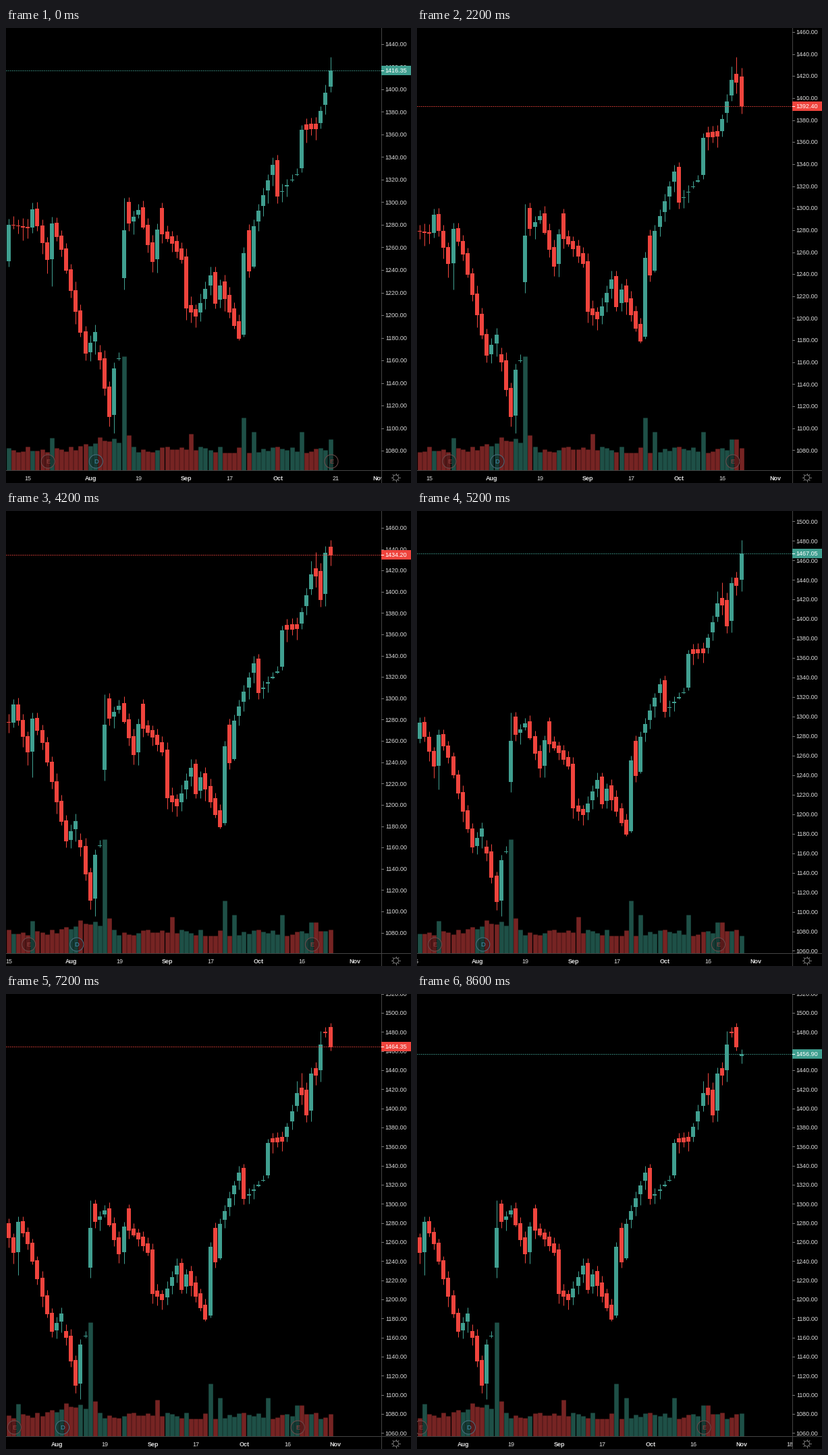
Recreate the animation shown at these times as a matplotlib script. Size 600 px wide and 675 px high, loop 8.8 s.

```python
import numpy as np
import matplotlib.pyplot as plt
from matplotlib.animation import FuncAnimation
from matplotlib.patches import Circle, Rectangle

W, H, DPI = 600, 675, 100
PT = 72 / DPI                       # points per pixel
STEP, LAST_X, BARS, VISIBLE = 7.116, 480.5, 76, 68
TOP, BOTTOM, BASE, AXIS_X = 42.7, 600.7, 655.5, 555.5
UP, DOWN = "#409f90", "#ef443d"
VOL_UP, VOL_DOWN = "#1e5047", "#762423"
TEXT, RULE = "#dadada", "#444444"

# Turning points of the closing price: (bar, price)
TURNS = [(0, 1280), (4, 1277), (5, 1294), (8, 1249), (9, 1281), (11, 1258),
         (16, 1166), (18, 1185), (21, 1110), (22, 1153), (23, 1162), (24, 1275),
         (27, 1293), (30, 1247), (31, 1276), (34, 1263), (36, 1249), (37, 1206),
         (39, 1199), (42, 1235), (43, 1210), (44, 1226), (48, 1179), (49, 1255),
         (50, 1239), (51, 1279), (55, 1333), (56, 1305), (60, 1325), (61, 1364),
         (64, 1365), (66, 1397), (67, 1416.35), (68, 1414.15), (69, 1392.4),
         (70, 1436.45), (71, 1434.2), (72, 1467.05), (73, 1479.1), (74, 1464.35),
         (75, 1456.9)]
# Notable bars that break the general rules
GAPS = {19: -18, 23: 9, 24: 71, 25: 25, 32: 19, 50: 20, 73: 13.4, 75: -9.4}
TALL_WICKS = {24: 29, 67: 12.4, 68: 15.7, 72: 14.1}
DEEP_WICKS = {9: 24, 22: 16}
BUSY_DAYS = {9: 48, 24: 169, 25: 52, 38: 54, 49: 78, 51: 57, 61: 57, 67: 46, 68: 46}


def override(values, special):
    values[list(special)] = list(special.values())
    return values


rng = np.random.default_rng(8)
bars = np.arange(BARS)
closes = np.interp(bars, *zip(*TURNS))
gaps = override(np.linspace(0, 6, BARS), GAPS)
opens = np.concatenate([[1248], closes[:-1]]) + gaps
highs = np.maximum(opens, closes) + override(rng.uniform(4, 8, BARS), TALL_WICKS)
lows = np.minimum(opens, closes) - override(rng.uniform(1, 12, BARS), DEEP_WICKS)
august_swell = 17 * np.exp(-((bars - 20) / 4) ** 2)
volumes = override(rng.uniform(25, 35, BARS) + august_swell, BUSY_DAYS)

rising = closes >= opens
candle_colors = np.where(rising, UP, DOWN)
volume_colors = np.where(rising, VOL_UP, VOL_DOWN)

fig = plt.figure(figsize=(W / DPI, H / DPI), dpi=DPI, facecolor="black")
ax = fig.add_axes([0, 0, 1, 1])


def label(x, y, text, color=TEXT, weight="normal", size=9, z=5):
    ax.text(x, y + 0.36 * size, text, color=color, weight=weight, ha="center",
            va="baseline", fontsize=size * PT, family="Liberation Sans", zorder=z)


def rule(xs, ys, color=RULE, width=1, z=6, **style):
    ax.plot(xs, ys, color=color, lw=width * PT, zorder=z, **style)


def columns(x, y0, y1, color, width, z):
    ax.vlines(x, y0, y1, colors=color, lw=width * PT, zorder=z, capstyle="butt")


def badge(x, letter, ring, ink):
    ax.add_patch(Circle((x, 643), 10, fc=(0, 0, 0, 0.25), ec=ring, lw=PT, zorder=4))
    label(x, 643, letter, ink, size=9.5)


def gear(x, y, color="#757575"):
    ax.add_patch(Circle((x, y), 4, fill=False, ec=color, lw=PT, zorder=8))
    for a in np.arange(8) * np.pi / 4:
        r = np.array([4.3, 6.2])
        rule(x + r * np.cos(a), y + r * np.sin(a), color, 1, 8)


def draw_candles(first, last, x_of, y_of):
    s = slice(first, last + 1)
    x = x_of(bars[s])
    columns(x, BASE, BASE - volumes[s], volume_colors[s], 6.6, 1)
    columns(x, y_of(highs[s]), y_of(lows[s]), candle_colors[s], 1, 2)
    top = y_of(np.maximum(opens[s], closes[s]))
    bottom = np.maximum(y_of(np.minimum(opens[s], closes[s])), top + 1.5)
    columns(x, top, bottom, candle_colors[s], 6, 3)


def draw_time_axis(shift, x_of):
    ticks = [(4, "15"), (17, "Aug"), (27, "19"), (37, "Sep"), (46, "17"), (56, "Oct")]
    ticks.append((65, "16") if shift else (68, "21"))
    ticks.append((77 if shift == 0 else 76 if shift < 5 else 75, "Nov"))
    if shift == 8:
        ticks.append((85, "18"))
    for bar, text in ticks:
        label(x_of(bar) + 0.5, 667.3, text, weight="bold" if text.isalpha() else "normal")


def draw_price_axis(last, y_of):
    ax.add_patch(Rectangle((AXIS_X, 0), W - AXIS_X, H, color="black", lw=0, zorder=6))
    rule([AXIS_X] * 2, [0, H])
    rule([0, W], [BASE] * 2)
    for price in range(1040, 1540, 20):
        y = y_of(price)
        if -4 < y < 654:
            rule([556, 559], [y, y], "#777777")
            label(578, y, f"{price}.00", z=7)
    close, color = closes[last], candle_colors[last]
    y = np.floor(y_of(close)) - 0.5
    rule([0, AXIS_X], [y, y], color, z=5, dashes=(1.4, 1.4), dash_capstyle="butt")
    ax.add_patch(Rectangle((AXIS_X, y - 6.5), W - AXIS_X, 13.5, color=color, lw=0, zorder=8))
    rule([556, 559], [y, y], "white", z=9)
    label(578, y + 0.5, f"{close:.2f}", "white", z=9)


def update(frame):
    shift = max(0, (frame - 1) // 5)      # one new bar per second
    first, last = shift, shift + VISIBLE - 1
    low, high = lows[first:last + 1].min(), highs[first:last + 1].max()

    def x_of(bar):
        return LAST_X + (bar - last) * STEP

    def y_of(price):
        return BOTTOM - (price - low) / (high - low) * (BOTTOM - TOP)

    ax.clear()
    ax.set(xlim=(0, W), ylim=(H, 0))
    ax.axis("off")
    draw_candles(first, last, x_of, y_of)
    for bar, letter, ring, ink in [(8, "E", "#6f4c4c", "#944442"),
                                   (18, "D", "#4a6f80", "#4390b2"),
                                   (67, "E", "#6f4c4c", "#944442")]:
        badge(x_of(bar) + 1.5, letter, ring, ink)
    draw_time_axis(shift, x_of)
    draw_price_axis(last, y_of)
    gear(577.5, 667)
    return []


anim = FuncAnimation(fig, update, frames=44, interval=200, repeat=True, repeat_delay=0)
plt.show()
```
